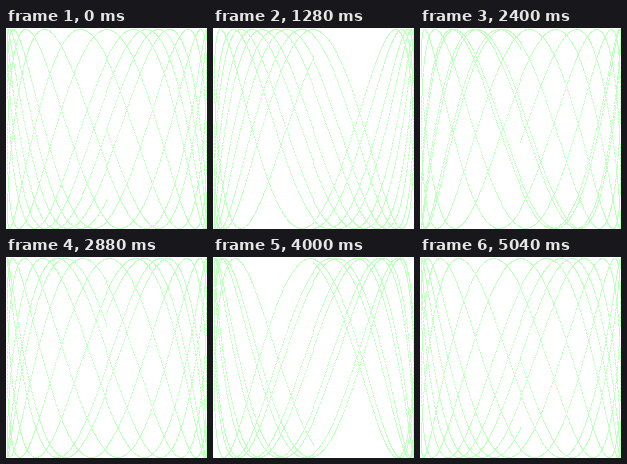
An HTML page with a canvas that plays this animation: 201 by 201 pixels, repeating every 5.12 s.

```html
<!DOCTYPE html>
<html lang="en">
<head>
<meta charset="utf-8">
<title>Lissajous</title>
<style>
  html, body { margin: 0; width: 100%; height: 100%; overflow: hidden; background: #fff; }
  canvas { display: block; width: 201px; height: 201px; image-rendering: pixelated; }
</style>
</head>
<body>
<canvas id="stage" width="201" height="201"></canvas>
<script>
  const R = 100, SIZE = 2 * R + 1;
  const CYCLES = 5, RES = 0.005, FREQ = 2.875;
  const STEPS = 64, DELAY = 80, PHASE_STEP = 0.1;
  const WHITE = 0xffffffff, GREEN = 0xffc0ffc0;

  const ctx = document.getElementById('stage').getContext('2d');
  const image = ctx.createImageData(SIZE, SIZE);
  const pixels = new Uint32Array(image.data.buffer);

  // Truncation toward zero keeps the curve one pixel off the top and left edges.
  const toPixel = v => R + Math.trunc(v * R + 0.5);

  function draw(phase) {
    pixels.fill(WHITE);
    for (let t = 0; t < CYCLES * 2 * Math.PI; t += RES) {
      const x = toPixel(Math.sin(t));
      const y = toPixel(Math.sin(t * FREQ + phase));
      pixels[y * SIZE + x] = GREEN;
    }
    ctx.putImageData(image, 0, 0);
  }

  let shown = -1;
  function tick() {
    const step = Math.floor(performance.now() / DELAY) % STEPS;
    if (step !== shown) {
      shown = step;
      draw(step * PHASE_STEP);
    }
    requestAnimationFrame(tick);
  }
  tick();
</script>
</body>
</html>
```
